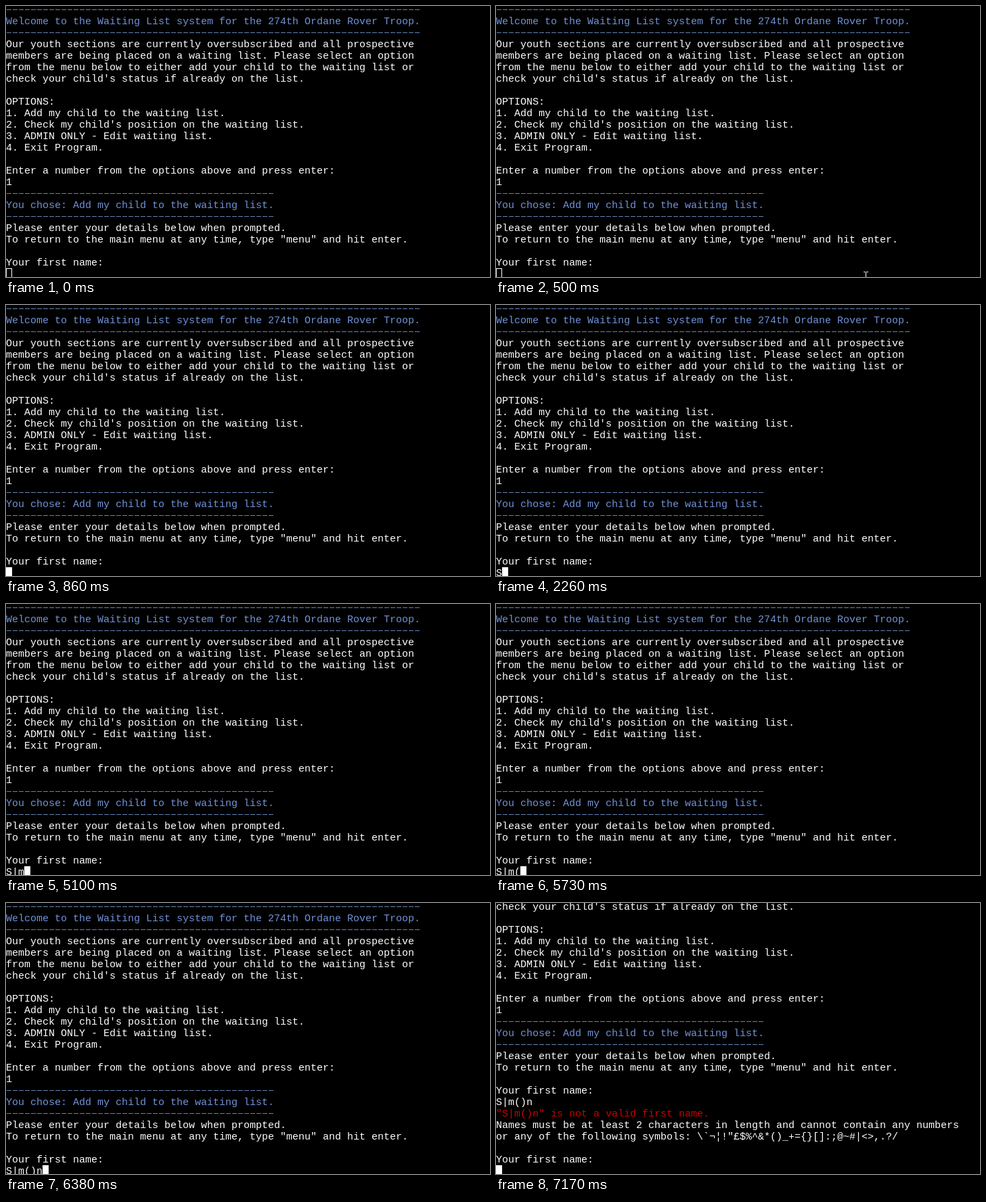
Recreate the animation shown at these times as an HTML page. Size 715 px wide and 401 px high, loop 8000 ms.

```html
<!DOCTYPE html>
<html lang="en">
<head>
<meta charset="utf-8">
<title>Waiting list terminal</title>
<style>
html, body { margin: 0; width: 100%; height: 100%; overflow: hidden; background: #000; }
#stage { position: relative; width: 715px; height: 401px; overflow: hidden; background: #000; }
#screen { position: absolute; left: 0; top: -2px; margin: 0; color: #fff;
  font: 15px/17px "Liberation Mono", "Courier New", monospace; font-variant-ligatures: none; }
#screen div { width: fit-content; height: 17px; white-space: pre; }
/* Rules show as wide, one pixel high dashes, one per character cell. */
#screen .rule { color: transparent;
  background: repeating-linear-gradient(90deg, #0000 0 1px, #6383b4 1px 8px, #0000 8px 9px) 0 7px / 100% 1px no-repeat; }
#screen .title { color: #7292d8; }
#screen .error { color: #c00; }
#caret { position: absolute; top: 388px; width: 9px; height: 17px; box-sizing: border-box; border: 1px solid #fff; }
#pointer { position: absolute; left: 0; top: 0; fill: none; stroke: #fff; }
</style>
</head>
<body>
<div id="stage">
  <div id="screen"></div>
  <div id="caret"></div>
  <svg id="pointer" width="7" height="16"><path d="M0 .5H3M4 .5H7M3.5 1V15M0 15.5H3M4 15.5H7"/></svg>
</div>
<script>
const LOOP = 8000, CELL = 9, FOCUS = 760, SUBMIT = 7170;
const NAME = 'S|m()n';
const KEYS = [2260, 3560, 5100, 5730, 5800, 6380];
const rule = n => ['-'.repeat(n), 'rule'];

const intro = [
  rule(68),
  ['Welcome to the Waiting List system for the 274th Ordane Rover Troop.', 'title'],
  rule(68),
  'Our youth sections are currently oversubscribed and all prospective',
  'members are being placed on a waiting list. Please select an option',
  'from the menu below to either add your child to the waiting list or',
  "check your child's status if already on the list.",
  '',
  'OPTIONS:',
  '1. Add my child to the waiting list.',
  "2. Check my child's position on the waiting list.",
  '3. ADMIN ONLY - Edit waiting list.',
  '4. Exit Program.',
  '',
  'Enter a number from the options above and press enter:',
  '1',
  rule(44),
  ['You chose: Add my child to the waiting list.', 'title'],
  rule(44),
  'Please enter your details below when prompted.',
  'To return to the main menu at any time, type "menu" and hit enter.',
  '',
  'Your first name:'
];
const reply = [
  NAME,
  [`"${NAME}" is not a valid first name.`, 'error'],
  'Names must be at least 2 characters in length and cannot contain any numbers',
  'or any of the following symbols: \\`¬¦!"£$%^&*()_+={}[]:;@~#|<>,.?/',
  '',
  'Your first name:'
];

const [screen, caret, pointer] = ['screen', 'caret', 'pointer'].map(id => document.getElementById(id));
const rows = Array.from({ length: 24 }, () => screen.appendChild(document.createElement('div')));
const start = performance.now();
let shown;

function print(lines) {
  rows.forEach((row, i) => {
    const [text, style = ''] = [].concat(lines[i]);
    row.textContent = text;
    row.className = style;
  });
}

// The mouse slides in along the bottom edge, then rises to click.
function movePointer(t) {
  pointer.style.display = t >= 260 && t < 860 ? '' : 'none';
  const p = Math.min(1, (Math.floor((t - 260) / 24) + 1) / 11);
  const x = 562 - 19 * p;
  const y = t < 660 ? 399 - 6 * p : 379;
  pointer.style.transform = `translate(${Math.round(x)}px, ${Math.round(y)}px)`;
}

function draw() {
  const t = (performance.now() - start) % LOOP;
  const sent = t >= SUBMIT;
  const typed = sent ? '' : NAME.slice(0, KEYS.filter(k => t >= k).length);
  const state = sent + typed;
  if (state !== shown) {
    print([...(sent ? [...intro, ...reply].slice(reply.length) : intro), typed]);
    caret.style.left = typed.length * CELL + 'px';
    shown = state;
  }
  caret.style.background = t < FOCUS ? 'none' : '#fff';
  movePointer(t);
  requestAnimationFrame(draw);
}

draw();
</script>
</body>
</html>
```
